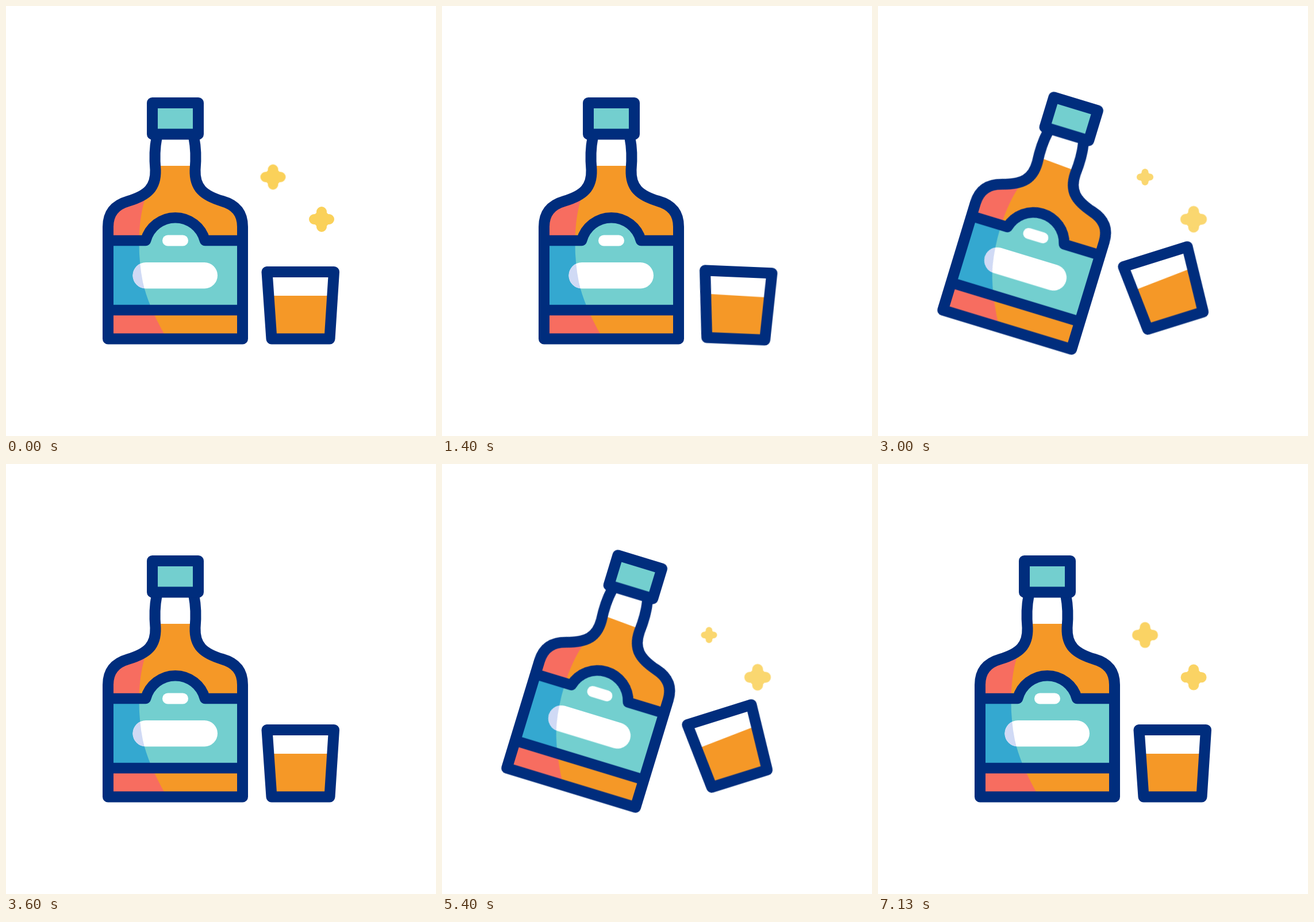
Recreate the animation shown at these times as an HTML page. Size 748 px wide and 748 px high, loop 7.19 s.

```html
<!DOCTYPE html>
<html lang="en">
<head>
<meta charset="utf-8">
<title>Bottle and glass</title>
<style>
  html, body { margin: 0; width: 100%; height: 100%; overflow: hidden; background: #fff; }
  svg { display: block; width: 100%; height: 100%; }

  .line { fill: none; stroke: #002d7d; stroke-width: 19; stroke-linejoin: round; stroke-linecap: round; }
  .trim { stroke-width: 18.5; }
  .teal { fill: #73cfcf; }
  .blue { fill: #34a8d0; }
  .orange { fill: #f59827; }
  .pink { fill: #f76d60; }
  .white { fill: #fff; }
  .lilac { fill: #d0daf5; }

  /* Three identical rounds make up the 7190 ms loop. */
  .bottle, .glass, .star, .surface { animation: 2396.67ms linear infinite; }
  .bottle { transform-origin: 294px 374px; animation-name: tilt; }
  .glass { transform-origin: 512px 520px; animation-name: toast; }
  .bottle .surface { transform-origin: 294px 278px; animation-name: slosh; }
  .glass .surface { transform-origin: 512px 504px; animation-name: ripple; }
  .star { fill: #fad15a; stroke: #fad15a; stroke-width: 18; stroke-linecap: round; }
  .first { animation-name: twinkle-a; }
  .second { animation-name: twinkle-b; }

  @keyframes tilt {
    0% { transform: none; animation-timing-function: cubic-bezier(.45, 0, .7, .9); }
    13.75% { transform: translate(-15px, -12px) rotate(12deg); animation-timing-function: ease-out; }
    19% { transform: translate(-13px, -12px) rotate(15.3deg); animation-timing-function: ease-in-out; }
    26.3% { transform: translate(-10px, -7px) rotate(17deg); animation-timing-function: ease-in-out; }
    30.4%, 36.7% { transform: translate(-13.5px, -11.7px) rotate(15.4deg); animation-timing-function: ease-in-out; }
    50%, 100% { transform: none; }
  }
  @keyframes toast {
    0% { transform: none; animation-timing-function: ease-in; }
    8.3% { transform: translate(4px, -10px) rotate(-9deg); }
    17.5% { transform: translate(-10px, -26px) rotate(-16deg); animation-timing-function: ease-out; }
    26.3%, 36.7% { transform: translate(-12.7px, -29px) rotate(-17.4deg); animation-timing-function: ease-in; }
    43.3% { transform: translate(4px, -10px) rotate(-9deg); animation-timing-function: ease-out; }
    50%, 54% { transform: none; animation-timing-function: ease-in-out; }
    70%, 82% { transform: translate(7px, -1px) rotate(15deg); animation-timing-function: ease-in-out; }
    94.5%, 100% { transform: none; }
  }
  @keyframes slosh {
    0%, 50%, 100% { transform: none; }
    20%, 36% { transform: rotate(3.4deg); }
  }
  @keyframes ripple {
    0%, 50%, 54%, 94.5%, 100% { transform: none; }
    20%, 36% { transform: rotate(-3.8deg); }
    70%, 82% { transform: rotate(3.4deg); }
  }
  @keyframes twinkle-a {
    0% { transform: scale(1); opacity: 1; }
    14%, 23% { transform: scale(1.05); opacity: .87; }
    29%, 63% { transform: scale(0); opacity: .87; }
    72%, 94.6% { transform: scale(1.05); opacity: .87; }
    100% { transform: scale(1); opacity: 1; }
  }
  @keyframes twinkle-b {
    0% { transform: scale(1); opacity: 1; }
    20%, 33% { transform: scale(1.05); opacity: .87; }
    41%, 70% { transform: scale(0); opacity: .87; }
    79%, 94.6% { transform: scale(1.05); opacity: .87; }
    100% { transform: scale(1); opacity: 1; }
  }
</style>
</head>
<body>
<svg viewBox="0 0 748 748">
  <defs>
    <path id="body" d="M262 230C259 245 258 262 260 285C261 316 246 329.500 212.500 339.500C190 346 177.500 360 177.500 384V579H411.500V384C411.500 360 399 346 376.500 339.500C343 329.500 328 316 329 285C331 262 330 245 327 230"/>
    <path id="cup" d="M454 462.500H570.500L563 579H462Z"/>
    <path id="label" d="M177.500 408H243A53.200 53.200 0 0 1 346 408H411.500V529H177.500Z"/>
    <rect id="plate" x="220.500" y="446" width="147.500" height="45.500" rx="22.750"/>
    <clipPath id="in-body"><use href="#body"/></clipPath>
    <clipPath id="in-cup"><use href="#cup"/></clipPath>
    <clipPath id="shade">
      <path d="M241 338C230 375 228 430 238 480C244 508 258 540 276 572V590H160V338Z"/>
    </clipPath>
    <g id="spark">
      <path d="M-13 0H13M0 -13V13"/>
      <circle r="14.500" stroke="none"/>
    </g>
  </defs>

  <g transform="translate(464.500 297.500)"><use class="star first" href="#spark"/></g>
  <g transform="translate(549 371)"><use class="star second" href="#spark"/></g>

  <g class="glass">
    <g clip-path="url(#in-cup)">
      <rect class="orange surface" x="420" y="504" width="184" height="120"/>
    </g>
    <use class="line" href="#cup"/>
  </g>

  <g class="bottle">
    <g clip-path="url(#in-body)">
      <rect class="orange surface" x="100" y="278" width="390" height="400"/>
      <g clip-path="url(#shade)"><rect class="pink" x="160" y="330" width="130" height="260"/></g>
      <use class="teal" href="#label"/>
      <g clip-path="url(#shade)"><rect class="blue" x="177" y="407" width="100" height="122"/></g>
      <use class="white" href="#plate"/>
      <g clip-path="url(#shade)"><use class="lilac" href="#plate"/></g>
      <rect class="white" x="272" y="398.500" width="45" height="19" rx="9.500"/>
    </g>
    <use class="line trim" href="#label"/>
    <use class="line" href="#body"/>
    <rect class="line" x="254.500" y="168.500" width="80" height="54.500" style="fill: #73cfcf"/>
  </g>
</svg>
</body>
</html>
```
